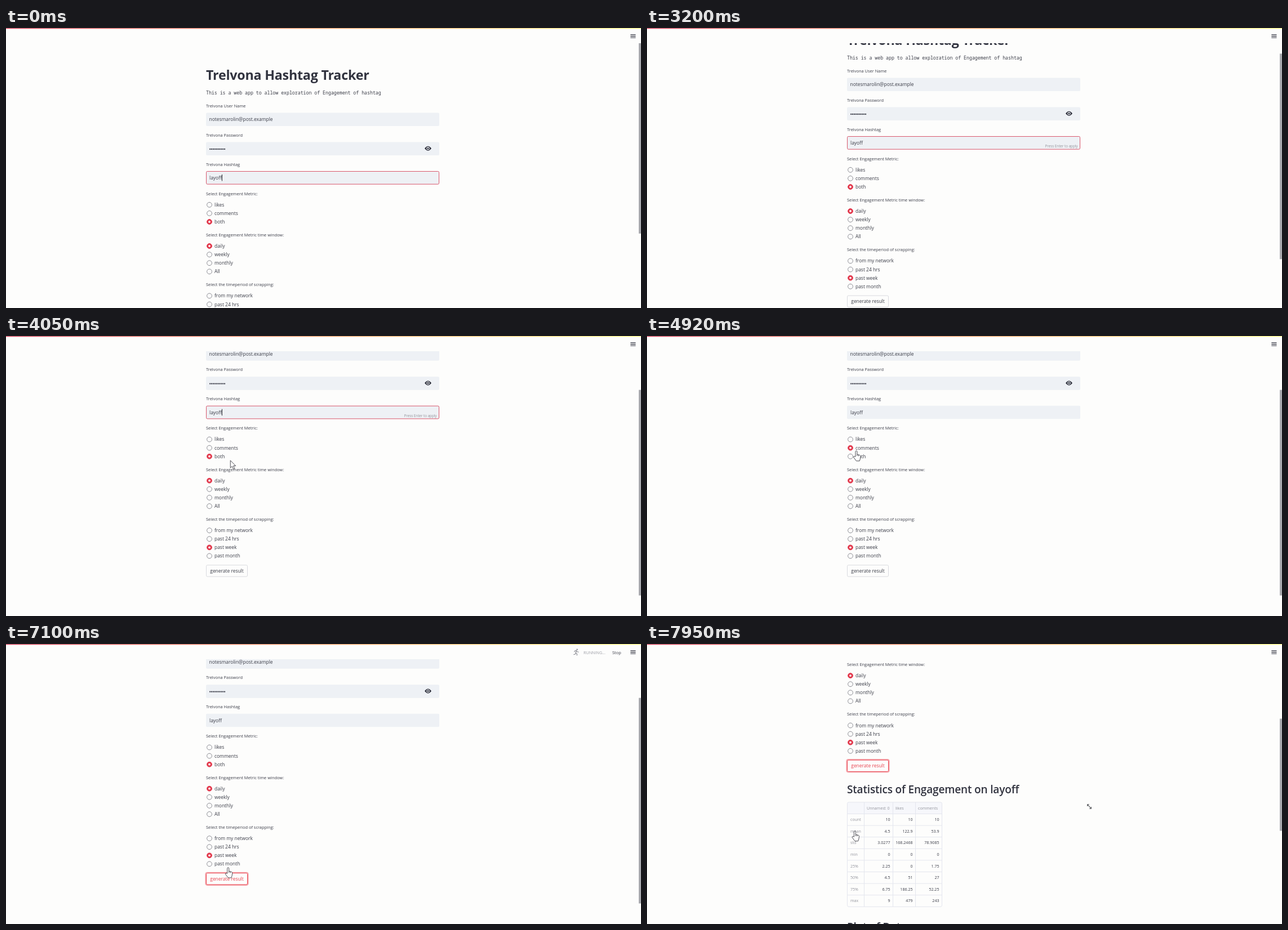
An HTML page that plays this animation: 1127x497 px, repeating every 7990 ms.

```html
<!DOCTYPE html>
<html lang="en">
<head>
<meta charset="utf-8">
<title>Hashtag Tracker</title>
<style>
  html, body { margin: 0; width: 100%; height: 100%; overflow: hidden; background: #fdfdfc; }
  svg { display: block; }
  text { font: 8.45px "Open Sans", sans-serif; fill: #3b3d48; white-space: pre; }
  text.title { font-size: 23.2px; font-weight: 700; letter-spacing: -.19px; fill: #31333f; }
  text.heading { font-size: 19px; font-weight: 600; letter-spacing: -.16px; fill: #31333f; }
  text.mono { font: 8.23px "Noto Sans Mono", monospace; }
  text.label { font-size: 7.45px; }
  text.hint { font-size: 6.25px; fill: #93949c; text-anchor: end; }
  text.cell { font-size: 7.1px; }
  text.dim { font-size: 7.1px; fill: #94959d; }
  text.num { text-anchor: end; }
  .field { fill: #eef1f5; }
  .line { fill: none; stroke: #e4e6ee; }
  .radio circle:first-child { fill: #fdfdfc; stroke: #8c8d94; }
  .radio circle:last-child { fill: none; }
  .radio.on circle:first-child { fill: #e2384c; stroke: #e2384c; }
  .radio.on circle:last-child { fill: #fff; }
  #button rect { fill: #fdfdfc; stroke: #d9dadf; }
  #button text { text-anchor: middle; }
  #button.hot rect { stroke: #e8434f; }
  #button.hot text { fill: #e8434f; }
  #button #ring { fill: none; stroke: #f6a5ab; stroke-width: 1.6; }
  #cursor path { fill: #fff; stroke: #3a3a42; stroke-width: .9; stroke-linejoin: round; }
</style>
</head>
<body>
<svg id="stage" width="1127" height="497" viewBox="0 0 1127 497"></svg>
<script>
const LOOP = 7990, VIEW = 497, LEFT = 355;
const TABLE_TOP = 611.8, ROW = 20.6;
const BLUR = 4300, HOVER = 6560, CLICK = 6930, RESULT = 7300, PLOT = 7700;

const text = (x, y, content, cls = '') => `<text x="${x}" y="${y}" class="${cls}">${content}</text>`;
const label = (y, content) => text(LEFT, y + 2.7, content, 'label');
const field = y => `<rect class="field" x="355" y="${y}" width="414" height="23.5" rx="2"/>`;
const line = d => `<path class="line" d="${d}"/>`;

const radios = (name, ys, options) => options.map((option, i) =>
  `<g class="radio" id="${name}${i}"><circle cx="361" cy="${ys + i * 15.1}" r="4.4"/>` +
  `<circle cx="361" cy="${ys + i * 15.1}" r="1.9"/></g>` + text(370, ys + i * 15.1 + 3, option)).join('');

function table() {
  const cols = [355.5, 385.5, 436.5, 476.5, 523.5];
  const rows = [
    ['count', 10, 10, 10], ['mean', 4.5, 122.9, 53.9], ['std', 3.0277, 168.2468, 78.9085],
    ['min', 0, 0, 0], ['25%', 2.25, 0, 1.75], ['50%', 4.5, 51, 27],
    ['75%', 6.75, 186.25, 52.25], ['max', 9, 479, 243]];
  const base = i => TABLE_TOP + ROW * i + 12.6;
  const bottom = TABLE_TOP + ROW * 9;
  let out = `<rect x="355.5" y="${TABLE_TOP}" width="168" height="${ROW}" fill="#f6f7fb"/>` +
    `<rect class="line" x="355.5" y="${TABLE_TOP}" width="168" height="${ROW * 9}" rx="2.5"/>`;
  for (let i = 1; i < 9; i++) out += line(`M355.5 ${TABLE_TOP + ROW * i}H523.5`);
  for (const x of cols.slice(1, 4)) out += line(`M${x} ${TABLE_TOP}V${bottom}`);
  ['Unnamed: 0', 'likes', 'comments'].forEach((name, i) => out += text(cols[i + 1] + 4.5, base(0), name, 'dim'));
  rows.forEach(([name, ...values], i) => {
    out += text(361, base(i + 1), name, 'dim');
    values.forEach((v, c) => out += text(cols[c + 2] - 5, base(i + 1), v, 'cell num'));
  });
  return out;
}

const dots = Array.from({ length: 10 }, (_, i) =>
  `<circle cx="${362.2 + i * 2.87}" cy="215" r="1.15" fill="#31333f"/>`).join('');

const eye = `<path d="M743 213.7Q749 205.7 755 213.7Q749 221.7 743 213.7Z" fill="#31333f"/>
  <circle cx="749" cy="213.7" r="2.1" fill="#31333f" stroke="#eef1f5" stroke-width="1.1"/>`;

const runner = `<circle cx="1013.6" cy="9.8" r="1.3" fill="#8f9097"/>
  <path d="M1008.5 14.2l1.2-2.2 2.6-.4 1.6 2.2 2.6.5M1012.3 11.8l-1.2 4 2.3 1.7v3M1011 16l-1 2.3-2.8.3"
    fill="none" stroke="#8f9097" stroke-width="1.2"/>`;

document.getElementById('stage').innerHTML = `
  <defs><linearGradient id="stripe">
    <stop stop-color="#d9455f"/><stop offset=".5" stop-color="#f0a068"/><stop offset="1" stop-color="#fdfb84"/>
  </linearGradient></defs>
  <rect width="1127" height="497" fill="#fdfdfc"/>
  <g id="page">
    ${text(LEFT, 92.3, 'Trelvona Hashtag Tracker', 'title')}
    ${text(LEFT, 118, 'This is a web app to allow exploration of Engagement of hashtag', 'mono')}
    ${label(138, 'Trelvona User Name')}${field(150.5)}${text(360.5, 165, 'notesmarolin@post.example')}
    ${label(190, 'Trelvona Password')}${field(202.5)}${dots}${eye}
    ${label(242, 'Trelvona Hashtag')}${field(254)}
    <rect id="focus" x="355.5" y="254.5" width="413" height="22.7" rx="2" fill="none" stroke="#d9586c"/>
    <text id="hashtag" x="361" y="269"></text>
    <rect id="caret" y="260" width="1" height="11.5" fill="#22232b"/>
    <text id="hint" class="hint" x="764.5" y="274">Press Enter to apply</text>
    ${label(294, 'Select Engagement Metric:')}
    ${radios('metric', 313.8, ['likes', 'comments', 'both'])}
    ${label(367.3, 'Select Engagement Metric time window:')}
    ${radios('window', 387, ['daily', 'weekly', 'monthly', 'All'])}
    ${label(455.4, 'Select the timeperiod of scrapping:')}
    ${radios('period', 475.4, ['from my network', 'past 24 hrs', 'past week', 'past month'])}
    <g id="button">
      <rect id="ring" x="354.2" y="535.8" width="75.6" height="22.6" rx="3"/>
      <rect x="355.5" y="537" width="73" height="20.3" rx="2"/>${text(392, 550, 'generate result')}
    </g>
    <g id="result">
      ${text(LEFT, 596, 'Statistics of Engagement on layoff', 'heading')}${table()}
      <path id="expand" d="M781.6 618.8v-3.2h3.2M788.4 619.8v3.2h-3.2M781.8 615.8l6.4 7"
        fill="none" stroke="#5b5c60" stroke-width="1.1"/>
    </g>
    <g id="plot">${text(LEFT, 840, 'Plot of Data', 'heading')}</g>
  </g>
  <rect id="thumb" x="1123" width="4" fill="#a8a9ae"/>
  <rect width="1127" height="27" fill="#fdfdfc"/>
  <rect width="1127" height="1.3" fill="url(#stripe)"/>
  <path d="M1108.3 11.9h9.2M1108.3 14.6h9.2M1108.3 17.3h9.2" stroke="#31333f" stroke-width="1.1"/>
  <g id="running">${runner}
    <text x="1025" y="17.5" style="font-size:7.2px;fill:#9d9ea6">RUNNING...</text>
    <text x="1076" y="17.5" style="font-size:7.4px">Stop</text>
  </g>
  <g id="cursor">
    <path id="arrow" d="M0 0V13.2L3.2 10.4L5.4 15.6L7.6 14.6L5.4 9.6H9.4Z"/>
    <path id="hand" d="M-1.5 10.2V1.3a1.5 1.5 0 0 1 3 0V6.2l4.6 1.2q1.7.6 1.4 2.4l-.6 4.2-1.2 3.8H0l-4.8-6.4q-.5-2 1.5-1.8zM1.5 6.2v2.8M4 7v2.4"/>
  </g>`;

const el = {};
document.querySelectorAll('[id]').forEach(node => el[node.id] = node);
const show = (id, on) => el[id].setAttribute('visibility', on ? 'inherit' : 'hidden');
const clamp = u => Math.max(0, Math.min(1, u));
const smooth = u => u * u * (3 - 2 * u);
const within = (t, a, b) => t >= a && t < b;

// [time, letters of the hashtag left in the field]
const keys = [[-310, 6], [670, 6], [1000, 5], [1170, 4], [1380, 3], [2310, 4], [2420, 5], [2560, 6]];
// [time, x, y] of the pointer tip
const path = [[3780, 440, 262], [4250, 372, 195], [4600, 372, 195], [4770, 371, 199], [4920, 371.5, 204],
  [5060, 372, 208], [5730, 372, 208], [6510, 405, 407], [6690, 400, 412], [6930, 400, 412], [7550, 369, 332]];
const busy = [[4350, 4700], [5130, 5600], [6980, 7850]];

function pointer(t) {
  const i = path.findIndex(p => p[0] > t);
  if (i < 1) return path[i < 0 ? path.length - 1 : 0].slice(1);
  const [a, b] = [path[i - 1], path[i]];
  const u = smooth((t - a[0]) / (b[0] - a[0]));
  return [a[1] + (b[1] - a[1]) * u, a[2] + (b[2] - a[2]) * u];
}

function scrollAt(t) {
  const first = 1 - (1 - clamp((t - 3110) / 470)) ** 3;
  return 130.3 * first + 201 * smooth(clamp((t - 7620) / 340));
}

function draw(t) {
  const scroll = scrollAt(t);
  el.page.setAttribute('transform', `translate(0 ${-scroll})`);
  const height = t < RESULT ? 677 : t < PLOT ? 965 : 1241;
  el.thumb.setAttribute('y', scroll * VIEW / height);
  el.thumb.setAttribute('height', VIEW * VIEW / height);

  const [pressed, count] = keys.filter(k => k[0] <= t).pop();
  el.hashtag.textContent = 'layoff'.slice(0, count);
  el.caret.setAttribute('x', 361 + el.hashtag.getComputedTextLength());
  show('caret', t < BLUR && (t - pressed) % 1060 < 530);
  show('focus', t < BLUR);
  show('hint', within(t, 1000, BLUR));

  const metric = within(t, BLUR, 5080) ? 1 : 2;
  for (let i = 0; i < 3; i++) el['metric' + i].classList.toggle('on', i === metric);
  el.button.classList.toggle('hot', t >= HOVER);
  show('ring', t >= CLICK);
  show('result', t >= RESULT);
  show('plot', t >= PLOT);
  show('running', busy.some(([a, b]) => within(t, a, b)));

  const [x, y] = pointer(t);
  const hand = within(t, 4150, 5830) || t >= 6530;
  el.cursor.setAttribute('transform', `translate(${x} ${y})`);
  show('cursor', t >= 3780);
  show('hand', hand);
  show('arrow', !hand);
  show('expand', t >= RESULT && y > TABLE_TOP - scroll);
}

el.window0.classList.add('on');
el.period2.classList.add('on');
(function frame() {
  draw(performance.now() % LOOP);
  requestAnimationFrame(frame);
})();
</script>
</body>
</html>
```
